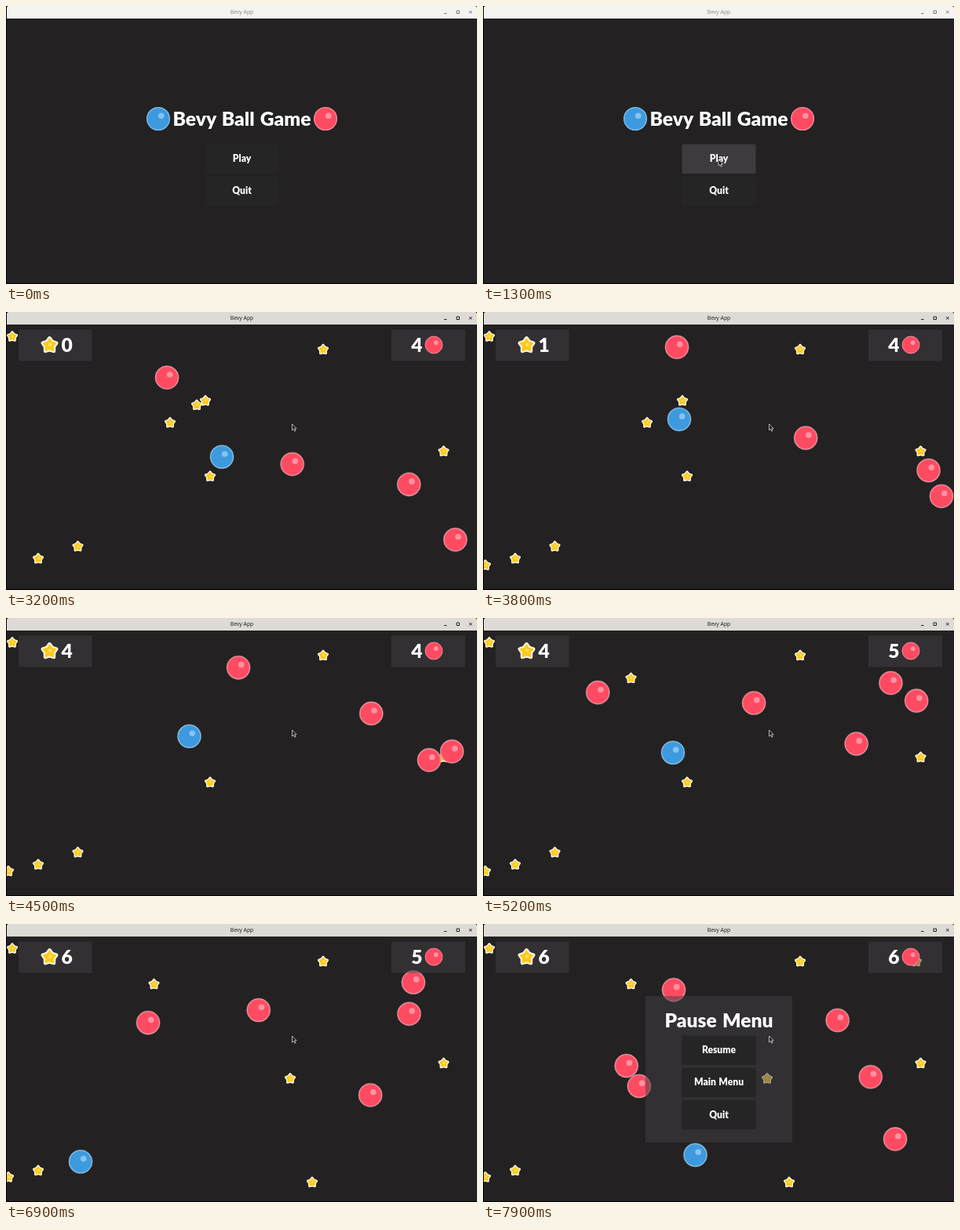
Write an HTML page that moves like this. It is 600 px wide and 355 px high and loops after 8 s.

```html
<!DOCTYPE html>
<html lang="en">
<head>
<meta charset="utf-8">
<title>Bevy App</title>
<style>
  html, body { margin: 0; width: 100%; height: 100%; overflow: hidden; background: #000; }
  svg { display: block; width: 600px; height: 355px; }
  text { fill: #fff; text-anchor: middle; font: 900 12.1px Lato, "Open Sans", sans-serif; word-spacing: .06em; }
  text.big { font-size: 24.6px; }
  #caption { font: 500 6.8px "Noto Sans", "Open Sans", sans-serif; word-spacing: 0; }
  .panel { fill: #434144; fill-opacity: .5; }
  .halo { fill: none; stroke: #999; stroke-opacity: .5; stroke-width: .8; }
</style>
</head>
<body>
<svg viewBox="0 0 600 355">
  <defs>
    <g id="red">
      <circle r="14.4" fill="#ff4b62" stroke="#f98c9b" stroke-width="1.3"/>
      <circle cx="3.7" cy="-3.7" r="3.8" fill="#ff93a1"/>
    </g>
    <g id="blue">
      <circle r="14.4" fill="#3d9ade" stroke="#83bfea" stroke-width="1.3"/>
      <circle cx="3.7" cy="-3.7" r="3.8" fill="#86c4f0"/>
    </g>
    <g id="star" stroke-linejoin="round"></g>
    <clipPath id="view"><rect x="1" y="16" width="599" height="338"/></clipPath>
  </defs>

  <rect x="1" y="16" width="599" height="338" fill="#232122"/>
  <path id="bar" d="M1 16V2.5Q1 0 3.5 0H597.5Q600 0 600 2.5V16Z"/>
  <text id="caption" x="300.5" y="10.3">Bevy App</text>
  <path id="icons" fill="none" d="M558 9.5h3.5M574 6h3.5v3.5h-3.5zM590 6l3.5 3.5m0-3.5l-3.5 3.5"/>

  <g id="menu">
    <use href="#blue" x="194" y="144"/>
    <text class="big" x="300.5" y="153">Bevy Ball Game</text>
    <use href="#red" x="407" y="144"/>
  </g>

  <g id="game" clip-path="url(#view)">
    <g id="world"></g>
    <rect class="panel" x="16" y="22.5" width="93.5" height="40"/>
    <rect class="panel" x="491" y="22.5" width="94" height="40"/>
    <use href="#star" transform="translate(55.5 42.5) scale(1.55)"/>
    <text id="score" class="big" x="77.7" y="51"></text>
    <text id="foes" class="big" x="523.5" y="51"></text>
    <use href="#red" transform="translate(545 42) scale(.76)"/>
  </g>

  <g id="pause">
    <rect class="panel" x="207" y="92" width="187" height="187"/>
    <text class="big" x="300.5" y="132">Pause Menu</text>
  </g>

  <path id="cursor" d="M0 0V8L1.9 6.3L3.2 9.2L4.5 8.6L3.2 5.8H5.6Z"
    fill="#111" stroke="#ddd" stroke-width=".8" stroke-linejoin="round"/>
</svg>
<script>
const LOOP = 8000, STEP = 100;
const PLAY = 1500, RESUME = 2700, PAUSE = 7770;
const SPEED = .0953;   // enemy pixels per ms
const REACH = 22;      // distance at which a star is collected
const FIRST_SPAWN = 3600, SECOND_WAVE = 4600;
const START_STARS = 10, START_FOES = 4;

const $ = id => document.getElementById(id);

function add(parent, tag, attrs, text = '') {
  const el = document.createElementNS('http://www.w3.org/2000/svg', tag);
  for (const k in attrs) el.setAttribute(k, attrs[k]);
  el.textContent = text;
  parent.append(el);
  return el;
}

const show = (el, on) => { el.style.display = on ? '' : 'none'; };
const place = (el, x, y) => el.setAttribute('transform', `translate(${x} ${y})`);

function starLayer(outer, inner, color, width) {
  const points = Array.from({ length: 10 }, (_, i) => {
    const r = i % 2 ? inner : outer, a = (i / 5 - .5) * Math.PI;
    return [r * Math.cos(a), r * Math.sin(a)];
  });
  add($('star'), 'polygon', { points: points.join(' '), fill: color, stroke: color, 'stroke-width': width });
}
starLayer(5.9, 3.7, '#fbf6e6', 3);
starLayer(5.2, 3, '#ffc917', 1.2);
add($('star'), 'circle', { cx: .5, cy: -.6, r: 1.5, fill: '#ffe06a' });

// Linear motion through waypoints [time, x, y]
function follow(path, t) {
  const next = path.findIndex(p => p[0] > t);
  if (next < 1) return path.at(next).slice(1);
  const [t0, x0, y0] = path[next - 1], [t1, x1, y1] = path[next];
  const k = (t - t0) / (t1 - t0);
  return [x0 + (x1 - x0) * k, y0 + (y1 - y0) * k];
}

// Reflect a coordinate between two walls
function bounce(v, lo, hi) {
  const span = hi - lo, m = (((v - lo) % (2 * span)) + 2 * span) % (2 * span);
  return lo + Math.min(m, 2 * span - m);
}

const walk = [
  [3100, 300, 185], [3300, 250, 185], [3600, 250, 185], [3800, 250, 137], [3950, 250, 126],
  [4300, 225, 130], [4700, 242, 172], [5200, 242, 172], [5500, 247, 200], [6100, 217.5, 242],
  [6600, 106, 282], [6900, 95, 303.5], [7150, 120, 295], [PAUSE, 270.5, 295]
];
const pointer = [
  [400, 569, 147], [1000, 210, 190], [1200, 300, 196], [1700, 300, 196],
  [2300, 334, 152], [2900, 334, 152], [3200, 364.5, 143]
];

// Start point and heading in degrees; later ones arrive every three seconds
const foes = [
  [170, 116, 42.7], [326, 222, 35.7], [468, 235, 18.2], [561, 337, 76.2],
  [134, 151, 77.6], [179.5, 197, 78.5]
].map(([x, y, deg], i) => ({
  x, y, angle: deg * Math.PI / 180,
  born: i < START_FOES ? RESUME : SECOND_WAVE + (i - START_FOES) * 3000
}));

// Later stars arrive once a second
const stars = [
  [8, 31.5], [404, 48], [254, 113.5], [243, 119], [209, 141.5], [557.5, 178], [261, 184],
  [260, 210], [91.5, 299.5], [41, 315],
  [3, 323.5], [188.5, 77], [390, 330], [362, 197.5], [552, 48]
].map(([x, y], i) => ({
  x, y, taken: Infinity,
  born: i < START_STARS ? 0 : FIRST_SPAWN + (i - START_STARS) * 1000
}));

for (let t = RESUME; t < PAUSE; t += STEP) {
  const [px, py] = follow(walk, t);
  for (const s of stars) {
    if (t >= s.born && Math.hypot(px - s.x, py - s.y) < REACH) s.taken = Math.min(s.taken, t);
  }
}

function makeBall(kind) {
  const g = add($('world'), 'g');
  add(g, 'use', { href: kind });
  add(g, 'circle', { r: 15.3, class: 'halo' });
  return g;
}
for (const s of stars) s.el = add($('world'), 'use', { href: '#star', x: s.x, y: s.y });
const player = makeBall('#blue');
for (const f of foes) f.el = makeBall('#red');

function makeButtons(parent, top, labels) {
  return labels.map((label, i) => {
    const y = top + i * 41.2;
    const box = add(parent, 'rect', { x: 253.5, y, width: 94, height: 37.5 });
    add(parent, 'text', { x: 300.5, y: y + 22.7 }, label);
    return { box, y };
  });
}
const menuButtons = makeButtons($('menu'), 176.5, ['Play', 'Quit']);
const pauseButtons = makeButtons($('pause'), 142.5, ['Resume', 'Main Menu', 'Quit']);

function hover(buttons, x, y) {
  for (const b of buttons) {
    const over = x > 253 && x < 348 && y > b.y && y < b.y + 37.5;
    b.box.setAttribute('fill', over ? '#3d3b3d' : '#262526');
  }
}

function draw(t) {
  const playing = t >= PLAY;
  const paused = playing && (t < RESUME || t >= PAUSE);
  $('bar').setAttribute('fill', playing ? '#dedbd7' : '#f5f4f2');
  $('caption').style.fill = playing ? '#222' : '#8c8c8a';
  $('icons').setAttribute('stroke', playing ? '#222' : '#777');
  show($('menu'), !playing);
  show($('game'), playing);
  show($('pause'), paused);

  const [cx, cy] = follow(pointer, t);
  show($('cursor'), t >= pointer[0][0]);
  place($('cursor'), cx, cy);
  hover(paused ? pauseButtons : menuButtons, cx, cy);

  for (const s of stars) show(s.el, t >= s.born && t < s.taken);
  place(player, ...follow(walk, t));

  for (const f of foes) {
    const d = SPEED * Math.max(0, Math.min(t, PAUSE) - f.born);
    show(f.el, f.born === RESUME || t >= f.born);
    place(f.el, bounce(f.x + d * Math.cos(f.angle), 15.5, 585), bounce(f.y - d * Math.sin(f.angle), 31.5, 338));
  }

  $('score').textContent = stars.filter(s => s.taken < t).length;
  $('foes').textContent = foes.filter(f => f.born === RESUME || t >= f.born).length;
}

const start = performance.now();
function tick() {
  const t = (performance.now() - start) % LOOP;
  draw(Math.floor(t / STEP) * STEP);
  requestAnimationFrame(tick);
}
tick();
</script>
</body>
</html>
```
